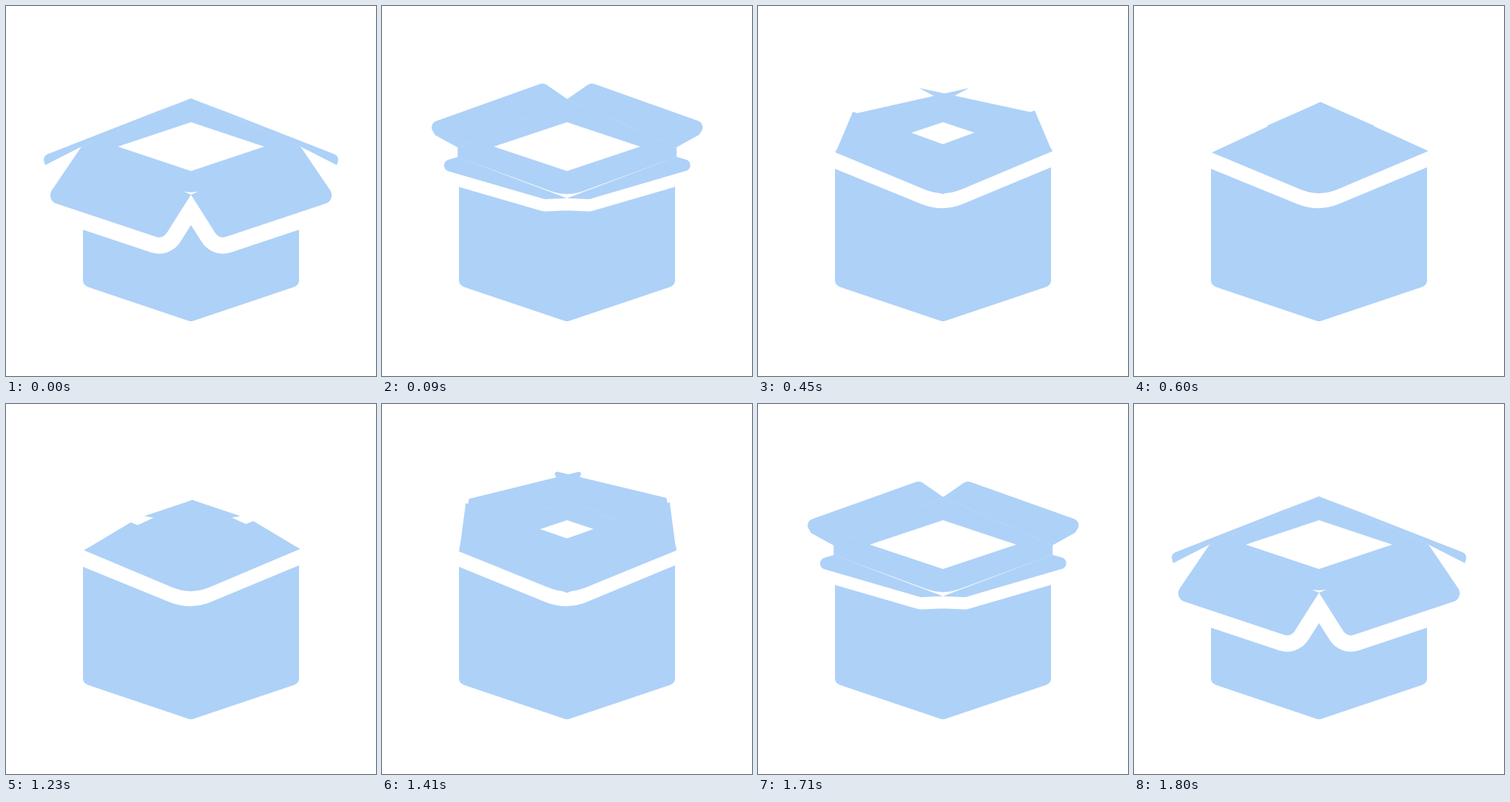
An HTML page with a canvas that plays this animation: 500x500 px, repeating every 2.7 s.

```html
<!DOCTYPE html>
<html>
<head>
<meta charset="utf-8">
<style>
html, body { margin: 0; height: 100%; overflow: hidden; background: #fff; }
canvas { display: block; }
</style>
</head>
<body>
<canvas id="stage" width="500" height="500"></canvas>
<script>
const ctx = document.getElementById('stage').getContext('2d');
const BLUE = '#aed1f7';

// Swing of a right-hand flap, from hinge to edge: open, upright, folding, closed.
const STEPS = [0, 0.4, 0.75, 1];
const FRONT = [[38, 60], [14, -79], [-26, -58], [-73, -33]];
const BACK = [[45, 17], [9, -71], [-34, -18], [-73, 32]];

const mix = (a, b, u) => a.map((v, i) => v + (b[i] - v) * u);
const move = ([x, y], dx, dy) => [x + dx, y + dy];
const round = ([x, y], r) => [x, y, r];

// Smooth curve through the poses of a swing.
function swing(poses, u) {
  const i = u < STEPS[1] ? 0 : u < STEPS[2] ? 1 : 2;
  const span = STEPS[i + 1] - STEPS[i], s = (u - STEPS[i]) / span, w = 1 - s;
  return [0, 1].map(axis => {
    const v = poses.map(pose => pose[axis]);
    const slope = k => {
      const a = Math.max(0, k - 1), b = Math.min(3, k + 1);
      return (v[b] - v[a]) / (STEPS[b] - STEPS[a]);
    };
    return v[i] * (1 + 2 * s) * w * w + v[i + 1] * s * s * (3 - 2 * s) +
      span * s * w * (slope(i) * w - slope(i + 1) * s);
  });
}

// Closed polygon of points, each with an optional corner radius.
function shape(points) {
  const last = points[points.length - 1], start = mix(last, points[0].slice(0, 2), 0.5);
  ctx.beginPath();
  ctx.moveTo(start[0], start[1]);
  points.forEach(([x, y, r = 0], i) => {
    const next = points[i + 1] || start;
    ctx.arcTo(x, y, next[0], next[1], r);
  });
  ctx.closePath();
}

function fill(points, color = BLUE) {
  shape(points);
  ctx.fillStyle = color;
  ctx.fill();
}

function outline(points, color, width) {
  shape(points);
  ctx.strokeStyle = color;
  ctx.lineWidth = width;
  ctx.stroke();
}

// u runs from 0 (open) to 1 (closed).
function draw(u) {
  const rest = 1 - u;
  const drop = 140 * u * rest ** 3;
  const left = mix([102, 190], [106, 198], u);
  const right = mix([398, 190], [397, 196], u);
  const top = mix([250, 125], [252, 130], u);
  const tip = move(mix([250, 255], [250, 253], u), 0, drop * 0.4);
  const lowLeft = move(left, 0, drop), lowRight = move(right, 0, drop);

  const frontR = Math.max(0, 12 - 27 * u);
  const backR = u < 0.4 ? 8 + 7 * u : Math.max(0, 11 - 32 * (u - 0.4));
  const [fx, fy] = swing(FRONT, u);
  const [bx, by] = swing(BACK, u);

  // side is -1 for left, 1 for right; outer corners flare away from the box
  const frontFlap = (hinge, side) => [
    hinge,
    round(move(hinge, side * (fx + 11 * rest), fy + 12 * rest), frontR),
    round(move(tip, side * fx, fy), frontR),
    tip
  ];
  const backFlap = (hinge, side) => {
    const outer = move(hinge, side * (bx + 8), by - 4 - 38 * u);
    return [
      hinge,
      mix(move(outer, -4 * side, 12), hinge, u),
      round(outer, backR),
      round(move(top, side * bx, by), backR),
      top
    ];
  };
  const frontFlaps = [frontFlap(lowLeft, -1), frontFlap(lowRight, 1)];
  const backFlaps = [backFlap(left, -1), backFlap(right, 1)];
  const rim = [left, top, right, lowRight, [250, 258, 65], lowLeft];

  ctx.fillStyle = '#fff';
  ctx.fillRect(0, 0, 500, 500);
  ctx.lineJoin = 'round';

  fill([[104, 220], [249, 279, 75], [396, 218], [396, 377.5, 10],
        [250, 426.5, 10], [104, 377.5, 10]]);

  const gap = 44 * Math.min(1, 1.5 - 5 * u);
  if (gap > 0) frontFlaps.forEach(flap => outline(flap, '#fff', gap));

  fill(rim);
  outline(rim, BLUE, 0.6);
  if (u < 0.9) fill([[250, 157], [349, 190], [250, 223], [151, 190]], '#fff');
  [...backFlaps, ...frontFlaps].forEach(flap => fill(flap));
}

function tick(now) {
  const t = Math.floor(now % 2700 / 30) * 30;
  draw((t < 1230 ? Math.min(t, 600) : Math.max(0, 1800 - t)) / 600);
  requestAnimationFrame(tick);
}
tick(0);
</script>
</body>
</html>
```
